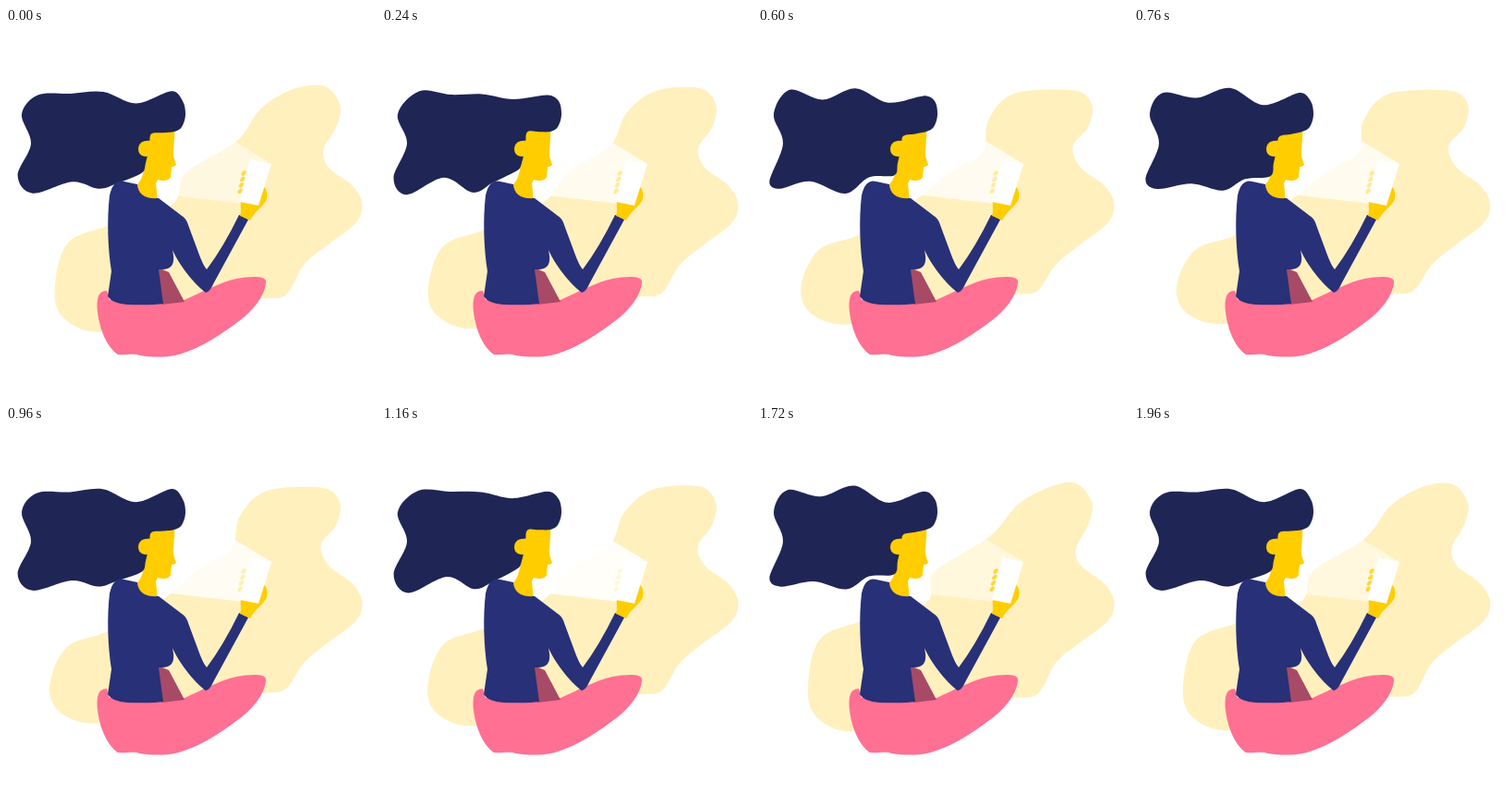
An HTML page with a canvas that plays this animation: 400x400 px, repeating every 2 s.

```html
<!DOCTYPE html>
<html lang="en">
<head>
<meta charset="utf-8">
<title>Reading by phone light</title>
<style>
html, body { margin: 0; width: 100%; height: 100%; overflow: hidden; background: #fff; }
canvas { display: block; width: 100vw; height: 100vh; }
</style>
</head>
<body>
<canvas id="stage" width="400" height="400"></canvas>
<script>
const ctx = document.getElementById('stage').getContext('2d');
const LOOP = 2000, STEP = 40;
const SKIN = '#ffcd00', HAIR = '#1f2555', SHIRT = '#283078';
const PINK = '#ff7093', SHADE = '#a84a66', CREAM = '#fff0be';

// Cosine swing that peaks when turn equals peak
const swing = (turn, peak) => Math.cos(2 * Math.PI * (turn - peak));

function smooth(points, color) {
  const n = points.length;
  const pt = i => points[(i + n) % n];
  ctx.beginPath();
  ctx.moveTo(...pt(0));
  for (let i = 0; i < n; i++) {
    const [a, b, c, d] = [pt(i - 1), pt(i), pt(i + 1), pt(i + 2)];
    // Limit handles so long spans do not distort short ones
    const len = Math.hypot(c[0] - b[0], c[1] - b[1]);
    const s1 = Math.min(1 / 6, 0.42 * len / Math.hypot(c[0] - a[0], c[1] - a[1]));
    const s2 = Math.min(1 / 6, 0.42 * len / Math.hypot(d[0] - b[0], d[1] - b[1]));
    ctx.bezierCurveTo(b[0] + (c[0] - a[0]) * s1, b[1] + (c[1] - a[1]) * s1,
      c[0] - (d[0] - b[0]) * s2, c[1] - (d[1] - b[1]) * s2, c[0], c[1]);
  }
  ctx.fillStyle = color;
  ctx.fill();
}

function shape(d, color) {
  ctx.fillStyle = color;
  ctx.fill(new Path2D(d));
}

// Key points: rest x, y and how far each leans with the slow swing
const blob = [
  [361, 83], [357, 107], [342, 130, 2, 2], [349, 151], [374, 170], [385, 190], [378, 211],
  [347, 235], [322, 256], [302, 287, 0, 3], [275, 291, -4, 3],
  [101, 325, 2, 5], [62, 313, 4, 4], [50, 284, 4, 4], [66, 236, 0, -4], [112, 217, 0, -6],
  [175, 189, 7, 2], [202, 155, -12, 3], [247, 127, 4, -8],
  [265, 92, 17, -8], [297, 68, 21, -3], [344, 65, 0, -3]
];

function drawBlob(turn) {
  const s = swing(turn, 0.86);
  smooth(blob.map(([x, y, dx = 0, dy = 0]) => [x + dx * s, y + dy * s]), CREAM);
}

const crown = [[179, 71.5], [141, 80], [106, 68], [71, 74], [36, 69]];
const hem = [[12.5, 163], [26, 177], [64, 165], [97, 177], [120, 165], [147, 157]];

// Waves travel along both edges of the hair
function drawHair(turn) {
  const top = crown.map(([x, y], i) => [
    x + 1.2 * i * swing(turn, 0.3),
    y + 3.5 * swing(turn, 0.44 + 0.38 * i)
  ]);
  const low = hem.map(([x, y], i) => [
    x + 8 * Math.exp(-((i - 2) ** 2)) * swing(turn, 0.05),
    y + 3.5 * swing(turn, 0.53 - 0.36 * i)
  ]);
  const bang = 2.5 * swing(turn, 0.72);
  smooth([...top, [17, 93], [27, 125], ...low, [151, 146], [155, 128],
    [157, 115 + bang], [170, 113.5 + bang / 2], [182, 112], [190, 107], [194, 94], [191, 79]], HAIR);
}

function drawHead() {
  shape('M157 107L182 107C183 121 180 132 181 139L184 148Q182 150 179 150L178 161Q175 167 164 164L162 168L164 187L146 186L142 169Q149 163 151 139Z', SKIN);
}

function drawEar() {
  shape('M157 122Q149 121 145 125C141 130 143 139 151 139L157 138Z', SKIN);
}

function drawBody() {
  shape('M109 284C98 284 98 296 99 307C101 324 108 344 121 353C130 354 138 351 145 354C158 356 171 356 182 354C207 349 235 330 258 312C273 299 281 284 281 274C280 267 262 269 249 271C231 275 213 285 193 294L112 294Z', PINK);
  shape('M164 259L176 264L193 296L168 299Z', SHADE);
  shape('M142 169C143 180 150 185 165 184L190 203Q195 206 197 213L207 240Q213 257 217 261Q235 237 252 202L262 207L225 275Q220 286 216 286C207 280 189 260 180 240C183 254 181 262 165 261L170 298Q158 300 131 299Q115 298 110 290L114 263C110 239 109 206 112 181Q116 163 128 166Z', SHIRT);
}

function drawPhone(fingers) {
  shape('M275 169C282 171 284 181 281 187C276 195 269 198 264 208L253 203C255 196 253 193 254 187L271 191Z', SKIN);
  shape('M264 142L287 147L273 192L253 188Z', '#fff');
  ctx.globalAlpha = fingers;
  ctx.fillStyle = SKIN;
  for (let i = 0; i < 4; i++) {
    ctx.beginPath();
    ctx.ellipse(257 - 1.3 * i, 157 + 6.4 * i, 3.2, 2, -0.9, 0, Math.PI * 2);
    ctx.fill();
  }
  ctx.globalAlpha = 1;
}

function draw(time) {
  const turn = time / LOOP;
  const light = 0.72 + 0.16 * swing(turn, 0.45) + 0.12 * swing(2 * turn, 0.3);
  ctx.fillStyle = '#fff';
  ctx.fillRect(0, 0, 400, 400);
  drawBlob(turn);
  shape('M180 150L246 122L287 147L273 192L162 179Z', `rgba(255,255,255,${light})`);
  drawHead();
  drawHair(2 * turn);
  drawEar();
  drawBody();
  drawPhone(1.5 * (1 - light));
}

const start = performance.now();
function tick() {
  const t = (performance.now() - start) % LOOP;
  draw(Math.floor(t / STEP) * STEP);
  requestAnimationFrame(tick);
}
tick();
</script>
</body>
</html>
```
